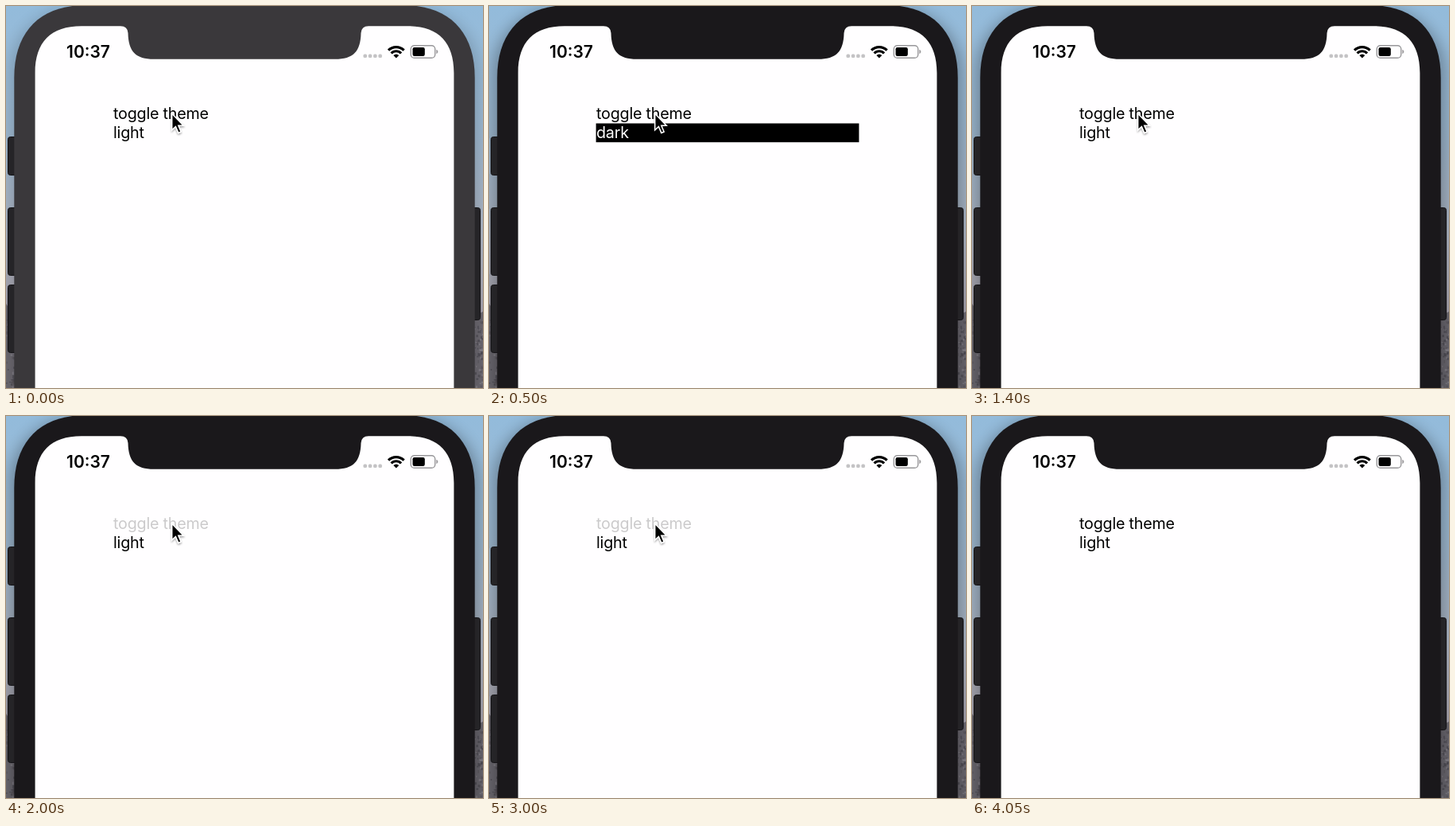
Write an HTML page that moves like this. It is 600x480 px and loops after 4.1 s.

```html
<!DOCTYPE html>
<html lang="en">
<head>
<meta charset="utf-8">
<title>Theme toggle</title>
<style>
  html, body { margin: 0; width: 100%; height: 100%; overflow: hidden; }
  svg { display: block; width: 600px; height: 480px; }
  text { font-family: Inter, Roboto, sans-serif; }
  .label { font-size: 19.7px; letter-spacing: -.2px; }
  .clock { font-size: 21px; font-weight: 600; }
</style>
</head>
<body>
<svg viewBox="0 0 600 480">
  <defs>
    <linearGradient id="sky" x2="0" y2="1">
      <stop offset="0" stop-color="#93bbdb"/>
      <stop offset=".3" stop-color="#9dbad3"/>
      <stop offset=".6" stop-color="#adb5c3"/>
      <stop offset=".8" stop-color="#a7a3ad"/>
    </linearGradient>
    <filter id="blur" x="-10%" y="-10%" width="120%" height="120%">
      <feGaussianBlur stdDeviation="9"/>
    </filter>
    <filter id="soft" x="-50%" y="-50%" width="200%" height="200%">
      <feDropShadow dx="0" dy="1.5" stdDeviation="1.3" flood-opacity=".4"/>
    </filter>
  </defs>

  <rect width="600" height="480" fill="url(#sky)"/>
  <path d="M0 374L12 392V480H0ZM588 390L600 384V480H588Z" fill="#6d6a72"/>
  <g id="rocks"></g>
  <rect id="shadow" x="4" y="2" width="592" height="560" rx="84" filter="url(#blur)"/>

  <g fill="#252427" stroke="#151417">
    <rect x="2.5" y="164.5" width="14" height="48" rx="3"/>
    <rect x="2.5" y="253.5" width="14" height="85" rx="3"/>
    <rect x="2.5" y="350.5" width="14" height="85" rx="3"/>
    <rect x="583.5" y="253.5" width="13" height="141" rx="3"/>
  </g>
  <path id="bezel" d="M10.300 480V90C10.300 32 43 -1 100 -1H500C557 -1 589.700 32 589.700 90V480Z"/>
  <path fill="#fffeff" d="M36.600 480V84C36.600 45 56.500 25.200 95 25.200H144Q153 25.200 153.500 34C154 57 163 66.800 186 66.800H414C437 66.800 446 57 446.500 34Q447 25.200 456 25.200H505C543.500 25.200 563.400 45 563.400 84V480Z"/>

  <text class="clock" x="76" y="65">10:37</text>
  <g id="dots" fill="#c4c3c5"></g>
  <g fill="none" stroke="#000" stroke-width="3.2">
    <path d="M481 55.700A13.600 13.600 0 0 1 500.600 55.700"/>
    <path d="M484.600 59.500A8.400 8.400 0 0 1 497 59.500"/>
  </g>
  <path d="M490.800 65.500L487.300 62Q490.800 58.800 494.300 62Z"/>
  <rect x="509.200" y="49.700" width="30.500" height="15.600" rx="4.400" fill="none" stroke="#98979a" stroke-width="1.4"/>
  <rect x="511.500" y="52" width="15.300" height="11" rx="2.200"/>
  <path d="M541.300 54.800Q543.300 55.600 543.300 57.500T541.300 60.200Z" fill="#98979a"/>

  <text id="toggle" class="label" x="135" y="142">toggle theme</text>
  <rect id="bar" x="134.600" y="147.500" width="330.800" height="23.700"/>
  <text id="theme" class="label" x="135" y="166"></text>
  <path id="cursor" d="M0 0V20.500L4.700 16.200L8.100 24.200L11.400 22.800L8.100 15H14.500Z"
    stroke="#fff" stroke-width="1.500" filter="url(#soft)"/>
</svg>

<script>
const LOOP = 4100, STEP = 50, FADE = 250;
const TAPS = [
  { down: 100, up: 250, swap: 250, theme: 'dark' },
  { down: 950, up: 1150, swap: 1150, theme: 'light' },
  { down: 2000, up: 2200, swap: 2250, theme: 'dark' },
  { down: 2850, up: 3000, swap: 3000, theme: 'light' }
];
const FOCUS = 50, LEAVE = 3150, GONE = 3300;

const el = id => document.getElementById(id);
const set = (id, attrs) => {
  for (const name in attrs) el(id).setAttribute(name, attrs[name]);
};
const clamp = x => Math.min(1, Math.max(0, x));
const easeInOut = x => x < .5 ? 2 * x * x : 1 - 2 * (1 - x) ** 2;

function addRect(parent, attrs) {
  const rect = document.createElementNS('http://www.w3.org/2000/svg', 'rect');
  for (const name in attrs) rect.setAttribute(name, attrs[name]);
  el(parent).append(rect);
}

let seed = 7;
const random = () => (seed = seed * 16807 % 2147483647) / 2147483647;

for (let i = 0; i < 4; i++)
  addRect('dots', { x: 449.5 + i * 6.3, y: 60.6, width: 4.5, height: 4.5, rx: 1.6 });

for (let i = 0; i < 120; i++) {
  const x = i % 2 ? 589 + random() * 10 : random() * 10;
  const y = 394 + random() * 86;
  const fill = ['#45434b', '#918e96', '#5d585e'][i % 3];
  addRect('rocks', { x, y, width: 1 + random() * 2, height: 1 + random() * 3, fill, opacity: .6 });
}

function labelOpacity(t) {
  const tap = TAPS.filter(tap => t >= tap.down).pop();
  return tap ? .2 + .8 * easeInOut(clamp((t - tap.up) / FADE)) : 1;
}

function draw(t) {
  const focused = t >= FOCUS;
  const swapped = TAPS.filter(tap => t >= tap.swap).pop();
  const theme = swapped ? swapped.theme : 'light';
  const dark = theme === 'dark';
  const lift = 47 * easeInOut(clamp((t - LEAVE) / 100));

  set('bezel', { fill: focused ? '#1a181b' : '#3a383b' });
  set('shadow', { opacity: focused ? .28 : .16 });
  set('toggle', { opacity: labelOpacity(t) });
  set('bar', { visibility: dark ? 'visible' : 'hidden' });
  set('theme', { fill: dark ? '#fff' : '#000' });
  el('theme').textContent = theme;
  set('cursor', {
    transform: `translate(208.700 ${135.2 - lift})`,
    visibility: t < GONE ? 'visible' : 'hidden'
  });
}

const start = performance.now();
function tick() {
  const t = (performance.now() - start) % LOOP;
  draw(Math.floor(t / STEP) * STEP);
  requestAnimationFrame(tick);
}
draw(0);
requestAnimationFrame(tick);
</script>
</body>
</html>
```
